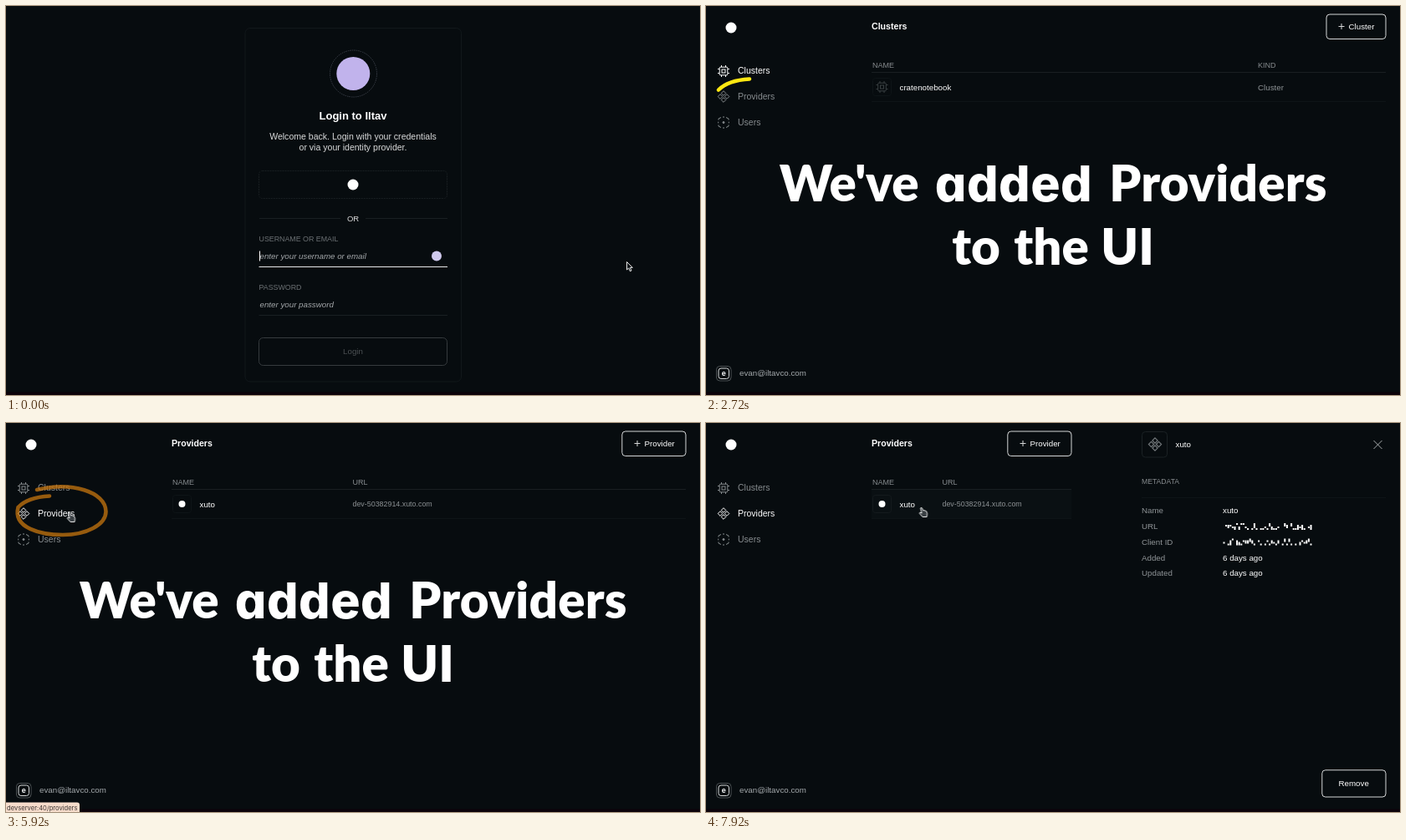
Write an HTML page that moves like this. It is 830 px wide and 466 px high and loops after 8 s.

```html
<!DOCTYPE html>
<html lang="en">
<head>
<meta charset="utf-8">
<title>Providers in the UI</title>
<style>
  html, body { margin: 0; width: 100%; height: 100%; overflow: hidden; background: #070c0f; }
  svg { display: block; width: 100vw; height: 100vh; }
  text { font: 9.75px "Liberation Sans", Arial, sans-serif; fill: #fff; }
  .mid { text-anchor: middle; }
  .grey { fill: #8f9497; }
  .caps { font-size: 9px; fill: #878c8f; }
  .label { font-size: 8.86px; fill: #6c7174; }
  .hint { font-style: italic; fill: #a3a7aa; }
  .title { font-size: 10.6px; font-weight: bold; }
  .url { font-size: 8.9px; fill: #8c9194; }
  .line { fill: none; stroke: #191f22; }
  .faint { fill: none; stroke: #0e1417; }
  .btn { fill: none; stroke: #d5d7d8; }
  .icon { fill: none; stroke: currentColor; }
  .nav text { font-size: 10.5px; fill: currentColor; }
  .nav g { color: #878c8f; }
  .dim { color: #3a4043; }
  .big { font: 900 60px Lato, "Open Sans", sans-serif; text-anchor: middle; }
  .round { font: 800 59px Inter, sans-serif; font-feature-settings: "cv11"; }

  .login, .app, .clusters, .wide, .panel, .status, .nav .on, .nav .off,
  .cursor, .arrow, .hand { animation: 8s step-end infinite; }
  .login { animation-name: login; }
  .app { animation-name: app; }
  .clusters { animation-name: clusters; }
  .wide { animation-name: wide; }
  .panel { animation-name: panel; }
  .status { animation-name: status; }
  .nav .on { animation-name: lose; }
  .nav .off { animation-name: gain; }
  .arrow { animation-name: arrow; }
  .hand { animation-name: hand; }
  .cursor { animation-name: move; animation-timing-function: ease-in-out; }
  .headline { animation: headline 8s linear infinite; }
  .loop {
    fill: none; stroke: #ffe712; stroke-width: 4.6; stroke-linecap: round;
    stroke-dasharray: 100 110; animation: draw 8s linear infinite, fade 8s linear infinite;
  }

  @keyframes login { 0% { opacity: 1 } 27%, 100% { opacity: 0 } }
  @keyframes app { 0% { opacity: 0 } 27%, 100% { opacity: 1 } }
  @keyframes clusters { 0% { opacity: 1 } 71%, 100% { opacity: 0 } }
  @keyframes wide { 0% { opacity: 0 } 71% { opacity: 1 } 93%, 100% { opacity: 0 } }
  @keyframes panel { 0% { opacity: 0 } 93%, 100% { opacity: 1 } }
  @keyframes status { 0% { opacity: 0 } 70% { opacity: 1 } 91%, 100% { opacity: 0 } }
  @keyframes lose { 0% { color: #fff } 71%, 100% { color: #878c8f } }
  @keyframes gain { 0% { color: #878c8f } 71%, 100% { color: #fff } }
  @keyframes arrow {
    0% { opacity: 1 } 2% { opacity: 0 } 54% { opacity: 1 }
    68.3% { opacity: 0 } 81% { opacity: 1 } 84.5%, 100% { opacity: 0 }
  }
  @keyframes hand {
    0% { opacity: 0 } 68.3% { opacity: 1 } 81% { opacity: 0 } 84.5%, 100% { opacity: 1 }
  }
  @keyframes move {
    0%, 54% { transform: translate(742px, 306px) }
    60%, 65% { transform: translate(172px, 99px) }
    69%, 79% { transform: translate(75.5px, 107px) }
    86%, 91% { transform: translate(219px, 105.5px) }
    96%, 100% { transform: translate(257.5px, 101px) }
  }
  @keyframes headline {
    0%, 29% { opacity: 0 } 32%, 90% { opacity: 1 } 93%, 100% { opacity: 0 }
  }
  @keyframes draw {
    0%, 32% { stroke-dashoffset: 100 } 34% { stroke-dashoffset: 85.5 }
    43%, 100% { stroke-dashoffset: 0 }
  }
  @keyframes fade {
    0%, 32% { opacity: 0; stroke: #ffe712 }
    32.1%, 71% { opacity: 1; stroke: #ffe712 }
    74% { opacity: .75; stroke: #c9760f }
    78%, 100% { opacity: 0; stroke: #c9760f }
  }
</style>
</head>
<body>
<svg viewBox="0 0 830 466" preserveAspectRatio="none">
  <defs>
    <g id="chip" class="icon">
      <rect x="-4.8" y="-4.8" width="9.6" height="9.6" rx="1"/>
      <rect x="-2" y="-2" width="4" height="4"/>
      <path d="M-2.5-5V-7M2.5-5V-7M-2.5 5V7M2.5 5V7M-5-2.5H-7M-5 2.5H-7M5-2.5H7M5 2.5H7"/>
    </g>
    <g id="gems" class="icon">
      <path d="M0-6.8L2.8-4L0-1.2L-2.8-4ZM0 1.2L2.8 4L0 6.8L-2.8 4ZM-4-2.8L-1.2 0L-4 2.8L-6.8 0ZM4-2.8L6.8 0L4 2.8L1.2 0Z"/>
    </g>
    <g id="people" class="icon">
      <path d="M-6-3V-4.5L-3-6M3-6L6-4.5V-3M6 3V4.5L3 6M-3 6L-6 4.5V3M-1-6.5H1M-1 6.5H1M-6.3-.8V.8M6.3-.8V.8"/>
      <circle r="1" fill="currentColor"/>
    </g>
    <path id="plus" class="btn" d="M-3.5 0H3.5M0-3.5V3.5"/>
  </defs>

  <rect width="830" height="466" fill="#070c0f"/>

  <g class="login">
    <rect class="line" x="286" y="26.5" width="258.5" height="423.5" rx="6" style="stroke:#12181b"/>
    <circle class="line" cx="415.5" cy="81" r="28" stroke-dasharray="1.5 1" style="stroke:#3a3f48"/>
    <circle cx="415.3" cy="81" r="20" fill="#c1b3ec"/>
    <text class="mid" x="415" y="135.5" style="font-size:13px;font-weight:bold">Login to Iltav</text>
    <g fill-opacity=".85">
      <text class="mid" x="415" y="160" style="font-size:10.55px">Welcome back. Login with your credentials</text>
      <text class="mid" x="415" y="173" style="font-size:10.55px">or via your identity provider.</text>
    </g>
    <rect class="line" x="302.5" y="197.5" width="225" height="33" rx="4" stroke-dasharray="2 1"/>
    <circle cx="415" cy="214" r="6.5" fill="#fff"/>
    <path class="line" d="M303 254.5H400M430 254.5H528"/>
    <text class="mid" x="415" y="258" style="font-size:9.5px" fill-opacity=".85">OR</text>

    <text class="label" x="302.5" y="282">USERNAME OR EMAIL</text>
    <text class="hint" id="userHint" x="303.5" y="303">enter your username or email</text>
    <text id="user" x="303" y="303"></text>
    <path id="userLine" d="M302.5 312.5H528"/>
    <text class="label" x="302.5" y="340">PASSWORD</text>
    <text class="hint" id="passHint" x="303.5" y="361">enter your password</text>
    <text id="pass" x="303" y="361"></text>
    <path id="passLine" d="M302.5 370.5H528"/>
    <g id="focus">
      <rect id="caret" y="-6" width="1" height="12" fill="#fff"/>
      <circle cx="515" r="6" fill="#cfc9ec"/>
    </g>

    <rect id="goBox" x="302.5" y="397.5" width="225" height="33" rx="5" fill="none" stroke="#363b3e"/>
    <text id="go" class="mid" x="415" y="417">Login</text>
  </g>

  <g class="app">
    <circle cx="30" cy="26" r="6.5" fill="#fff"/>
    <g class="nav">
      <g class="on"><use href="#chip" x="21" y="78"/><text x="38" y="81">Clusters</text></g>
      <g class="off"><use href="#gems" x="21" y="108.5"/><text x="38" y="112">Providers</text></g>
      <g><use href="#people" x="21" y="139.5"/><text x="38" y="143">Users</text></g>
    </g>
    <rect x="12.5" y="431.5" width="17.5" height="17.5" rx="4" fill="none" stroke="#4a4f52"/>
    <rect class="btn" x="15" y="434" width="12.5" height="12.5" rx="3"/>
    <text class="mid" x="21.2" y="443" style="font-size:9px;font-weight:bold">e</text>
    <text x="40" y="443" style="fill:#a5aaad">evan@iltavco.com</text>

    <g class="clusters">
      <text class="title" x="198" y="28">Clusters</text>
      <rect class="btn" x="742" y="10" width="71" height="29.5" rx="4"/>
      <use href="#plus" x="760" y="24.5"/>
      <text x="768.5" y="28">Cluster</text>
      <text class="caps" x="199" y="74">NAME</text>
      <text class="caps" x="660" y="74">KIND</text>
      <path class="line" d="M198 79.5H813"/>
      <path class="faint" d="M198 114.5H813"/>
      <rect class="faint" x="199.5" y="86.5" width="22" height="21" rx="3"/>
      <g class="dim"><use href="#chip" x="210.5" y="97"/></g>
      <text x="231.5" y="100.5">cratenotebook</text>
      <text class="grey" x="660" y="100.5">Cluster</text>
    </g>

    <g class="wide">
      <text class="title" x="198" y="28">Providers</text>
      <rect class="btn" x="736.8" y="10" width="76.2" height="29.5" rx="4"/>
      <use href="#plus" x="755" y="24.5"/>
      <text x="763.5" y="28">Provider</text>
      <text class="caps" x="199" y="74">NAME</text>
      <text class="caps" x="414.5" y="74">URL</text>
      <path class="line" d="M198 79.5H813"/>
      <path class="faint" d="M198 114.5H813"/>
      <rect class="faint" x="199.5" y="86.5" width="22" height="21" rx="3"/>
      <circle cx="210.5" cy="97" r="4" fill="#fff"/>
      <text x="231.5" y="100.5">xuto</text>
      <text class="url" x="414.5" y="100">dev-50382914.xuto.com</text>
    </g>

    <g class="panel">
      <text class="title" x="198" y="28">Providers</text>
      <rect class="btn" x="360.8" y="10" width="76.2" height="29.5" rx="4"/>
      <use href="#plus" x="379" y="24.5"/>
      <text x="387.5" y="28">Provider</text>
      <text class="caps" x="199" y="74">NAME</text>
      <text class="caps" x="282.5" y="74">URL</text>
      <rect x="198" y="80" width="239" height="34" fill="#0a1013"/>
      <path class="line" d="M198 79.5H437"/>
      <path class="faint" d="M198 114.5H437"/>
      <rect class="line" x="199.5" y="86.5" width="22" height="21" rx="3" style="stroke:#141a1d"/>
      <circle cx="210.5" cy="97" r="4" fill="#fff"/>
      <text x="231.5" y="100.5">xuto</text>
      <text class="url" x="282.5" y="100">dev-50382914.xuto.com</text>

      <rect class="line" x="521.5" y="10.5" width="30" height="30.5" rx="4" style="stroke:#1b2124"/>
      <g transform="translate(537 25.5) scale(1.12)" color="#74797c"><use href="#gems"/></g>
      <text x="561.5" y="29">xuto</text>
      <path d="M798.5 21L808.5 31M808.5 21L798.5 31" fill="none" stroke="#a9adaf"/>
      <text class="caps" x="521" y="73" style="font-size:8.65px">METADATA</text>
      <path class="faint" d="M521 89.5H813"/>
      <text class="grey" x="521" y="108">Name</text>
      <text class="grey" x="521" y="127">URL</text>
      <text class="grey" x="521" y="145.5">Client ID</text>
      <text class="grey" x="521" y="164.5">Added</text>
      <text class="grey" x="521" y="183">Updated</text>
      <text x="618" y="108">xuto</text>
      <path id="blur" fill="#fff"/>
      <text x="618" y="164.5">6 days ago</text>
      <text x="618" y="183">6 days ago</text>
      <rect class="btn" x="736.8" y="415.8" width="76.2" height="32.2" rx="4"/>
      <text class="mid" x="774.7" y="435">Remove</text>
    </g>

    <path class="loop" pathLength="100" d="M52 87.5C34 88.5 21 94 14.5 101C8 126 42 134 68 134C96 134 119.5 122 119.5 106C119 82 78 70 37 80"/>
    <g class="headline">
      <text class="big" x="171" y="233.5" letter-spacing="-.2">We've</text>
      <text class="big round" x="368" y="233.5" letter-spacing=".5">added</text>
      <text class="big" x="612.5" y="233.5" letter-spacing=".2">Providers</text>
      <text class="big" x="323" y="309.5">to</text>
      <text class="big" x="413" y="309.5">the</text>
      <text class="big" x="504" y="309.5">UI</text>
    </g>
  </g>

  <rect y="462.5" width="830" height="3.5" fill="#0d030b"/>
  <g class="status">
    <path d="M0 454.5H85Q88 454.5 88 457.5V466H0Z" fill="#f6dccb"/>
    <text x="1" y="463.5" style="font:7.6px Inter,sans-serif;fill:#3c3432">devserver:40/providers</text>
  </g>

  <g class="cursor" stroke="#fff" fill="#11161a" stroke-linejoin="round" stroke-width=".9">
    <path class="arrow" d="M.5.5V10L2.7 8L4.3 11.7L6 11L4.4 7.4H7.3Z"/>
    <path class="hand" fill="#3a4044" d="M-1 1Q.2-.3 1 1L2.3 4L3 3.5L4.3 4L5.2 4L6.2 5Q7.5 7 6.8 10L6.5 11.5H1.5L-2 7.5Q-2.5 6 -1 6.2L.5 7Z"/>
  </g>
</svg>
<script>
  const $ = id => document.getElementById(id);
  const email = "evan@iltavco.com";
  const loop = 8000, tab = 1480;
  const clamp = (n, max) => Math.max(0, Math.min(max, n));
  const typed = (t, start, pace, max) => clamp(Math.floor((t - start) / pace) + 1, max);

  // Scrambled values in the details panel
  let seed = 11;
  const rnd = () => (seed = (seed * 16807) % 2147483647) / 2147483647;
  let blocks = "";
  for (const [y, width] of [[120, 104], [138.5, 109]])
    for (let x = 0; x < width; x += 2.6) {
      if (rnd() < .2) continue;
      const top = y + Math.floor(rnd() * 4) * 2;
      const h = Math.min(y + 8 - top, 2 + Math.floor(rnd() * 3) * 2);
      blocks += `M${618.5 + x} ${top}h2v${h}h-2z`;
    }
  $("blur").setAttribute("d", blocks);

  function form(t) {
    const n = typed(t, 160, 75, email.length);
    const dots = typed(t, 1640, 40, 8);
    const onPass = t >= tab;
    $("user").textContent = email.slice(0, n);
    $("pass").textContent = "•".repeat(dots);
    $("userHint").style.opacity = n ? 0 : 1;
    $("passHint").style.opacity = dots ? 0 : 1;
    $("userLine").setAttribute("stroke", onPass ? "#191f22" : "#e8e9ea");
    $("passLine").setAttribute("stroke", t > tab + 80 ? "#e8e9ea" : "#191f22");
    $("focus").setAttribute("transform", `translate(0 ${onPass ? 357.7 : 299.5})`);
    const field = onPass ? $("pass") : $("user");
    $("caret").setAttribute("x", 303 + (field.textContent ? field.getComputedTextLength() : 0));
    $("go").style.fill = dots ? "#fff" : "#4b5053";
    $("goBox").setAttribute("stroke", dots ? "#d5d7d8" : "#363b3e");
  }

  const begin = performance.now();
  function tick() {
    form((performance.now() - begin) % loop);
    requestAnimationFrame(tick);
  }
  tick();
</script>
</body>
</html>
```
